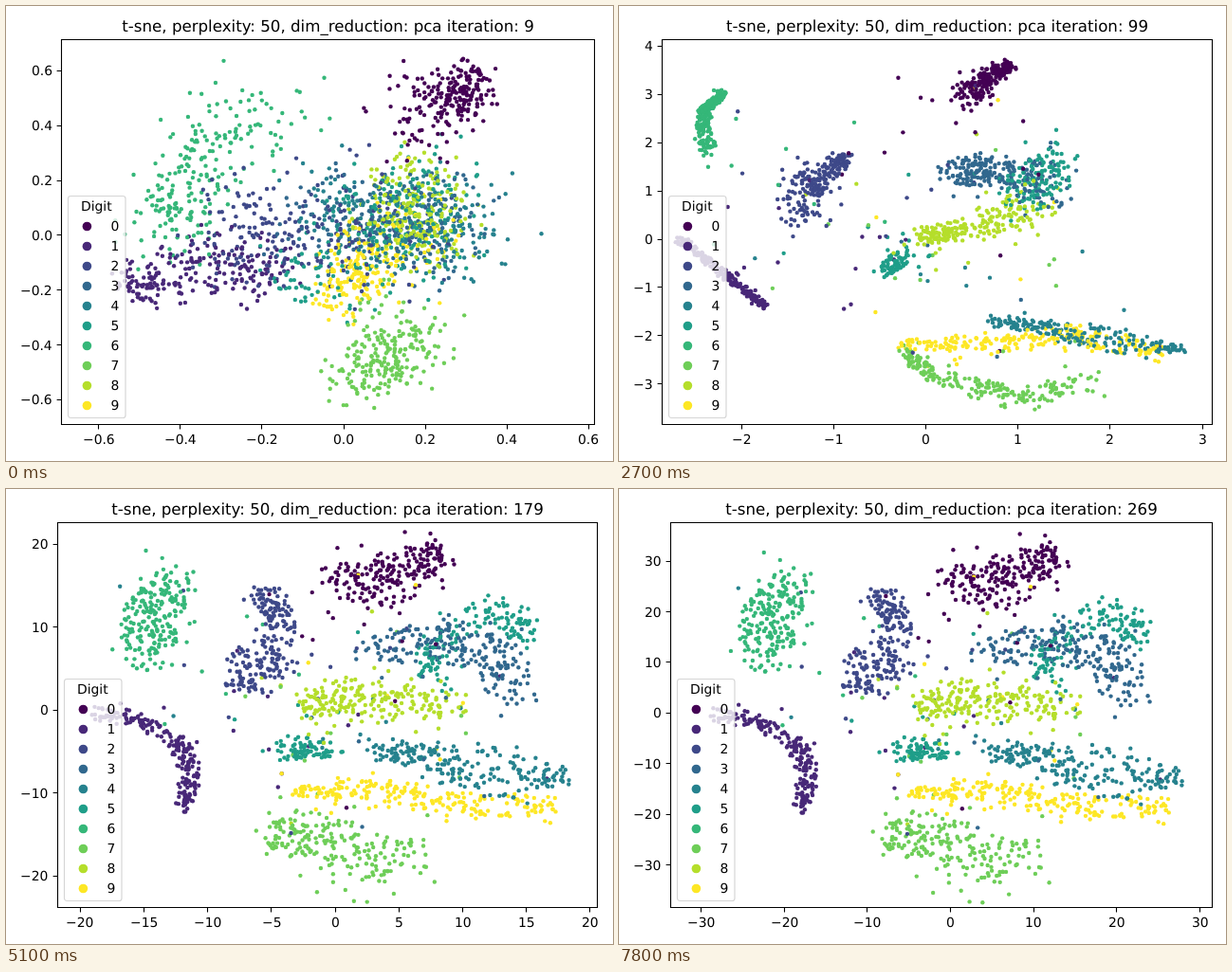
These frames come from a looping animation (640x480 px, 8 s). An HTML page:

```html
<!DOCTYPE html>
<html lang="en">
<head>
<meta charset="utf-8">
<title>Embedding scatter</title>
<style>
  html, body { margin: 0; width: 100%; height: 100%; overflow: hidden; background: #fff; }
  svg { display: block; width: 640px; height: 480px; font: 13.89px "DejaVu Sans", sans-serif;
        text-rendering: geometricPrecision; }
</style>
</head>
<body>
<svg id="stage" viewBox="0 0 640 480"></svg>
<script>
const STEP_MS = 300, LOOP_MS = 8000, LAST = 26;
const FONT = 13.89, TOP = 35.5, BOTTOM = 441.5, RIGHT = 625.5;
const COLORS = ["#440154", "#482878", "#3e4989", "#31688e", "#26828e",
                "#1f9e89", "#35b779", "#6ece58", "#b5de2b", "#fde725"];
const stage = document.getElementById("stage");

function add(parent, tag, attrs, text) {
  const el = document.createElementNS("http://www.w3.org/2000/svg", tag);
  set(el, attrs);
  if (text !== undefined) el.textContent = text;
  parent.appendChild(el);
  return el;
}
function set(el, attrs) {
  for (const k in attrs) el.setAttribute(k, attrs[k]);
}
const mix = (a, b, t) => a + (b - a) * t;
const blend = (a, b, t) => a.map((v, n) => mix(v, b[n], t));

let seed = 20;
function rand() {
  seed = (seed + 0x6D2B79F5) | 0;
  let r = Math.imul(seed ^ (seed >>> 15), 1 | seed);
  r = (r + Math.imul(r ^ (r >>> 7), 61 | r)) ^ r;
  return ((r ^ (r >>> 14)) >>> 0) / 4294967296;
}
function polar(r) {
  const a = rand() * 2 * Math.PI;
  return [r * Math.cos(a), r * Math.sin(a)];
}
const disc = () => polar(Math.sqrt(rand()) * (rand() < 0.1 ? 1.9 : 1));
const gauss = () => polar(Math.min(2.6, Math.sqrt(-2 * Math.log(1 - rand()))));

// A band is a path of nodes [x, y, radius]; s runs along it, offset lies across it.
function onBand(band, s, offset) {
  const k = s * (band.length - 1), i = Math.min(Math.floor(k), band.length - 2);
  const [x, y, r] = blend(band[i], band[i + 1], k - i);
  return [x + offset[0] * r, y + offset[1] * r];
}

const groups = [];
const group = (digit, count, start, tight, open) =>
  groups.push({ digit, count, start, tight, open });

group(0, 220, [[500, 80, 12], [470, 98, 18], [430, 128, 28]],
  [[418, 57, 4], [392, 70, 12], [370, 95, 15]],
  [[455, 66, 12], [405, 89, 32], [345, 95, 18]]);
group(1, 220, [[125, 300, 10], [165, 285, 16], [225, 268, 18], [284, 286, 17]],
  [[78, 246, 5], [120, 280, 5], [166, 319, 4]],
  [[88, 234, 8], [130, 240, 8], [175, 265, 11], [188, 295, 14], [180, 335, 9]]);
group(2, 220, [[230, 245, 30], [300, 235, 30], [410, 235, 35]],
  [[250, 157, 7], [215, 183, 14], [195, 205, 32]],
  [[265, 108, 14], [292, 140, 18], [268, 192, 22], [228, 185, 23]]);
group(3, 220, [[330, 225, 30], [430, 235, 28], [460, 230, 28]],
  [[355, 172, 15], [400, 172, 17], [465, 188, 28]],
  [[375, 168, 17], [460, 155, 22], [520, 175, 33], [530, 205, 26]]);
group(4, 220, [[320, 215, 28], [430, 235, 28], [500, 232, 32]],
  [[398, 334, 5], [460, 342, 9], [520, 356, 15], [595, 365, 4]],
  [[385, 273, 9], [455, 282, 18], [520, 300, 30], [588, 302, 11]]);
group(5, 80, [[285, 290, 16], [400, 250, 35]],
  [[288, 280, 7], [312, 260, 15]],
  [[285, 270, 15], [338, 274, 9]]);
group(5, 140, [[400, 235, 36], [445, 205, 36]],
  [[425, 192, 30], [460, 172, 25]],
  [[455, 200, 20], [440, 165, 16], [515, 122, 18], [552, 155, 14]]);
group(6, 220, [[165, 238, 22], [180, 195, 26], [212, 142, 22], [290, 110, 30]],
  [[122, 86, 4], [100, 110, 7], [106, 148, 9]],
  [[165, 95, 22], [145, 135, 36], [142, 165, 28]]);
group(7, 220, [[360, 398, 15], [408, 365, 23], [415, 345, 28]],
  [[308, 368, 6], [340, 395, 9], [425, 415, 9], [510, 402, 17]],
  [[275, 365, 19], [310, 362, 26], [365, 385, 30], [440, 395, 25]]);
group(8, 220, [[425, 215, 22], [435, 220, 32]],
  [[325, 242, 11], [350, 238, 11], [400, 228, 14], [445, 205, 28]],
  [[312, 226, 17], [345, 215, 21], [400, 222, 20], [472, 225, 17]]);
group(9, 220, [[350, 310, 16], [372, 275, 17], [430, 235, 32]],
  [[305, 360, 6], [400, 358, 9], [480, 352, 16], [570, 367, 6]],
  [[300, 318, 5], [385, 315, 15], [470, 335, 18], [575, 332, 10]]);

// Slow drifts of the whole layout
const squeeze = ([x, y]) => [x * 1.028 - 15.5, y * 0.974 + 7];
const drift = ([x, y]) => [x * 0.97 + 18, y * 0.99 + 6];

const points = [];
for (const g of groups) {
  for (let i = 0; i < g.count; i++) {
    const s = rand(), offset = disc();
    const pull = rand() < 0.07 ? rand() : 0;
    const other = groups[Math.floor(rand() * groups.length)];
    const pose = key => blend(onBand(g[key], s, offset), onBand(other[key], s, offset), pull);
    const tight = pose("tight"), open = pose("open");
    points.push({
      digit: g.digit,
      poses: [onBand(g.start, s, gauss()), tight, squeeze(tight), open, drift(open)]
    });
  }
}
for (let i = points.length - 1; i > 0; i--) {
  const j = Math.floor(rand() * (i + 1));
  [points[i], points[j]] = [points[j], points[i]];
}

const linear = t => t;
const out = t => 1 - (1 - t) ** 2;
const settle = t => 1 - (1 - t) ** 2.6;
const poseKeys = [[0, out], [5, linear], [9, linear], [13, settle], [LAST]];

// Axis limits: [step, x min, x max, y min, y max]
const limitKeys = [
  [0, -0.691, 0.614, -0.690, 0.714],
  [5, -3.043, 3.194, -3.970, 4.239],
  [9, -2.860, 3.107, -3.835, 4.130],
  [13, -13.88, 13.64, -14.84, 13.82],
  [17, -21.75, 20.56, -23.77, 22.57],
  [20, -26.20, 24.78, -29.30, 28.10],
  [LAST, -33.65, 31.48, -38.40, 37.60]
];

function segment(keys, step) {
  let i = 0;
  while (i < keys.length - 2 && step >= keys[i + 1][0]) i++;
  return [i, (step - keys[i][0]) / (keys[i + 1][0] - keys[i][0])];
}

function limitsAt(step) {
  const [i, t] = segment(limitKeys, step);
  return blend(limitKeys[i], limitKeys[i + 1], i === 0 ? out(t) : t).slice(1);
}

function ticks(lo, hi) {
  const raw = (hi - lo) / 9, base = 10 ** Math.floor(Math.log10(raw));
  const factor = [1, 2, 2.5, 5, 10].find(f => f * base >= raw);
  const gap = factor * base;
  const digits = Math.max(0, (factor === 2.5 ? 1 : 0) - Math.floor(Math.log10(gap) + 1e-9));
  const list = [];
  for (let n = Math.ceil(lo / gap); n * gap <= hi; n++) {
    const label = (n < 0 ? "\u2212" : "") + Math.abs(n * gap).toFixed(digits);
    list.push({ value: n * gap, label });
  }
  return list;
}
const charWidth = { "\u2212": 0.838, ".": 0.318 };
const textWidth = s => [...s].reduce((w, c) => w + (charWidth[c] || 0.636), 0) * FONT;

add(stage, "rect", { width: 640, height: 480, fill: "#fff" });
const dotLayer = add(stage, "g", {});
for (const p of points) p.el = add(dotLayer, "circle", { r: 2.2, fill: COLORS[p.digit] });
const axes = add(stage, "g", {});
const title = add(stage, "text", { y: 27, "font-size": 16.67, "text-anchor": "middle" });

const legend = add(stage, "g", {});
add(legend, "rect", { x: 0, y: 200.5, width: 60.5, height: 234, rx: 2.8,
  fill: "#fff", "fill-opacity": 0.8, stroke: "#ccc", "stroke-opacity": 0.8, "stroke-width": 1.2 });
add(legend, "text", { x: 29.8, y: 216, "text-anchor": "middle" }, "Digit");
COLORS.forEach((fill, i) => {
  const cy = 232.5 + i * 21;
  add(legend, "circle", { cx: 19.9, cy, r: 4.8, fill });
  add(legend, "text", { x: 45, y: cy + 4.5 }, i);
});

function drawAxes([x0, x1, y0, y1]) {
  const xs = ticks(x0, x1), ys = ticks(y0, y1);
  const left = Math.floor(24.8 + Math.max(...ys.map(t => textWidth(t.label)))) + 0.5;
  const end = xs[xs.length - 1];
  const endX = mix(left, RIGHT, (end.value - x0) / (x1 - x0)) + textWidth(end.label) / 2;
  const right = Math.floor(RIGHT - Math.max(0, endX - 625.2)) + 0.5;
  const snap = v => Math.floor(v) + 0.5;

  axes.textContent = "";
  let path = `M${left} ${TOP}H${right}V${BOTTOM}H${left}Z`;
  for (const { value, label } of xs) {
    const x = mix(left, right, (value - x0) / (x1 - x0));
    path += `M${snap(x)} ${BOTTOM}v4.9`;
    add(axes, "text", { x: Math.round(x - textWidth(label) / 2), y: 462 }, label);
  }
  for (const { value, label } of ys) {
    const y = mix(BOTTOM, TOP, (value - y0) / (y1 - y0));
    path += `M${left} ${snap(y)}h-4.9`;
    add(axes, "text", { x: Math.round(left - 9.7 - textWidth(label)), y: Math.round(y + 5) }, label);
  }
  add(axes, "path", { d: path, fill: "none", stroke: "#000", "stroke-width": 1.1 });
  set(title, { x: (left + right) / 2 });
  set(legend, { transform: `translate(${left + 7} 0)` });
}

function draw(step) {
  const [i, t] = segment(poseKeys, step), k = poseKeys[i][1](t);
  for (const { el, poses } of points) {
    const [x, y] = blend(poses[i], poses[i + 1], k);
    set(el, { cx: x.toFixed(2), cy: y.toFixed(2) });
  }
  drawAxes(limitsAt(step));
  title.textContent = `t-sne, perplexity: 50, dim_reduction: pca iteration: ${9 + step * 10}`;
}

const begin = performance.now();
let shown = -1;
function tick() {
  const time = (performance.now() - begin) % LOOP_MS;
  const step = Math.min(LAST, Math.floor(time / STEP_MS));
  if (step !== shown) draw(shown = step);
  requestAnimationFrame(tick);
}
tick();
</script>
</body>
</html>
```
